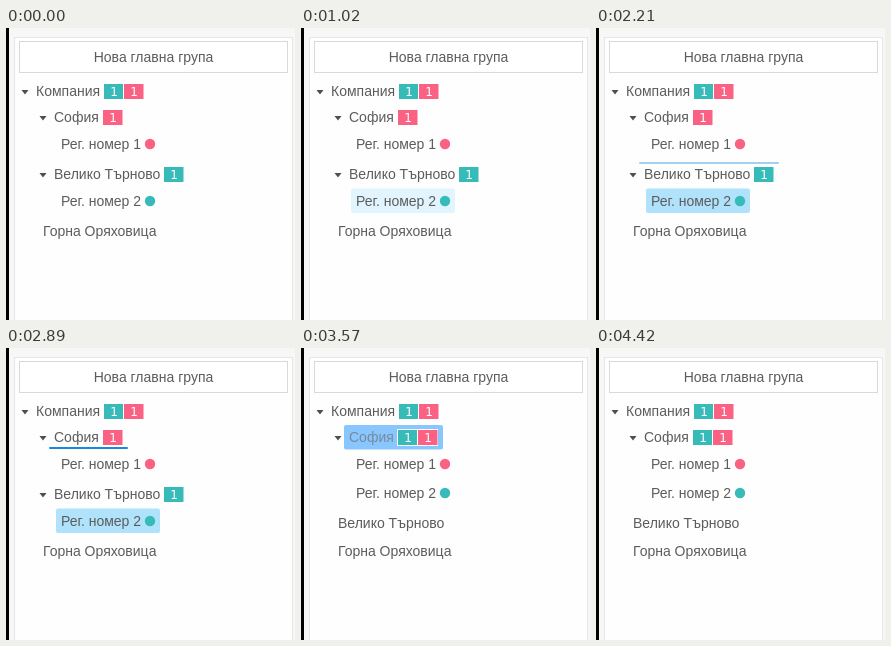
Animation of 289 by 292 pixels, one loop 4930 ms. Source, as an HTML page:

```html
<!DOCTYPE html>
<html lang="bg">
<head>
<meta charset="utf-8">
<title>Дърво с групи</title>
<style>
  html, body { margin: 0; width: 100%; height: 100%; overflow: hidden; background: #f7f7f7; }
  svg { display: block; }
  text { font: 14px "Liberation Sans", Arial, sans-serif; fill: #5c5c5c; }
  .count { font: 12px "DejaVu Sans", sans-serif; fill: #fff; text-anchor: middle; }
  .mid { text-anchor: middle; }
  .caret { fill: #4f4f4f; }
</style>
</head>
<body>
<svg id="stage" width="289" height="292" viewBox="0 0 289 292">
  <rect width="3" height="292" fill="#000"/>
  <rect x="8.5" y="9.5" width="278" height="300" fill="#fefefe" stroke="#e6e6e6"/>
  <rect x="13.5" y="13.5" width="268" height="31" fill="#fff" stroke="#d9d9d9"/>
  <text class="mid" x="147.5" y="34">Нова главна група</text>
  <g id="tree"></g>
</svg>
<script>
const LOOP = 4930;
const TEAL = '#36bbb8', PINK = '#fa6183', BLUE = '#1a88dc';
const tree = document.getElementById('tree');

const label = (x, y, s, fill = '#5c5c5c') =>
  `<text x="${x}" y="${y}" style="fill:${fill}">${s}</text>`;
const caret = (x, y) => `<path class="caret" d="M${x} ${y}h7l-3.5 4.5z"/>`;
const dot = (y, color) => `<circle cx="144" cy="${y}" r="5.2" fill="${color}"/>`;
const badge = (x, y, color) =>
  `<rect x="${x - 1}" y="${y - 1}" width="21" height="17" fill="#fff"/>` +
  `<rect x="${x}" y="${y}" width="19.5" height="15" fill="${color}"/>` +
  `<text class="count" x="${x + 10}" y="${y + 12}">1</text>`;
const box = (x, y, w, fill, o = 1) =>
  `<rect x="${x}" y="${y}" width="${w}" height="24.5" rx="2" fill="${fill}" opacity="${o}"/>`;
const bar = (x, y, w, o) =>
  `<rect x="${x}" y="${y}" width="${w}" height="2" rx="1" fill="${BLUE}" opacity="${o}"/>`;

// Label colour over a blue drop target of strength k
const mix = k => {
  const v = Math.round(92 + 150 * k);
  return `rgb(${v},${v},${v})`;
};

// Time, then what differs from the resting tree
const steps = [
  [0, {}],
  [850, { row: '#f0faff' }],
  [1020, { row: '#e2f5fe' }],
  [1870, { row: '#d6f1fd' }],
  [2040, { row: '#b9e6fc' }],
  [2210, { row: '#b0e2fb', line: [43, 134, 140, .4] }],
  [2380, { row: '#b0e2fb', line: [50, 127, 104, .8] }],
  [2550, { row: '#b0e2fb', first: .5 }],
  [2720, { row: '#b0e2fb', line: [50, 103, 104, .5] }],
  [2890, { row: '#b0e2fb', line: [43, 99, 79, 1] }],
  [3060, { row: '#b0e2fb', over: .5 }],
  [3230, { row: '#b0e2fb', over: .8 }],
  [3570, { moved: true, over: .5, ink: '#768a9c' }],
  [3740, { moved: true, over: .15, ink: '#62686d' }],
  [3910, { moved: true }]
];

function draw({ row, line, first = 0, over = 0, ink, moved }) {
  let s = caret(15.5, 62) + label(30, 68, 'Компания') +
    badge(98, 56, TEAL) + badge(118, 56, PINK);

  if (over) s += box(43, 77, 99, '#1890ff', over);
  s += caret(33.5, 88) + label(48, 94, 'София', ink || mix(over));
  s += moved ? badge(97, 82, TEAL) + badge(117, 82, PINK) : badge(97, 82, PINK);

  if (first) s += box(50, 104, 104, '#1890ff', first);
  s += label(55, 121, 'Рег. номер 1', mix(first)) + dot(116, PINK);

  if (moved) {
    s += label(55, 150, 'Рег. номер 2') + dot(145, TEAL) +
      label(37, 180, 'Велико Търново');
  } else {
    if (row) s += box(50, 160.5, 104, row);
    s += caret(33.5, 145) + label(48, 151, 'Велико Търново') + badge(158, 139, TEAL) +
      label(55, 178, 'Рег. номер 2') + dot(173, TEAL);
  }
  s += label(37, 208, 'Горна Оряховица');
  if (line) s += bar(...line);
  tree.innerHTML = s;
}

let shown = null;
function tick() {
  const t = performance.now() % LOOP;
  const step = steps.filter(([at]) => at <= t).pop();
  if (step !== shown) draw((shown = step)[1]);
  requestAnimationFrame(tick);
}
tick();
</script>
</body>
</html>
```
